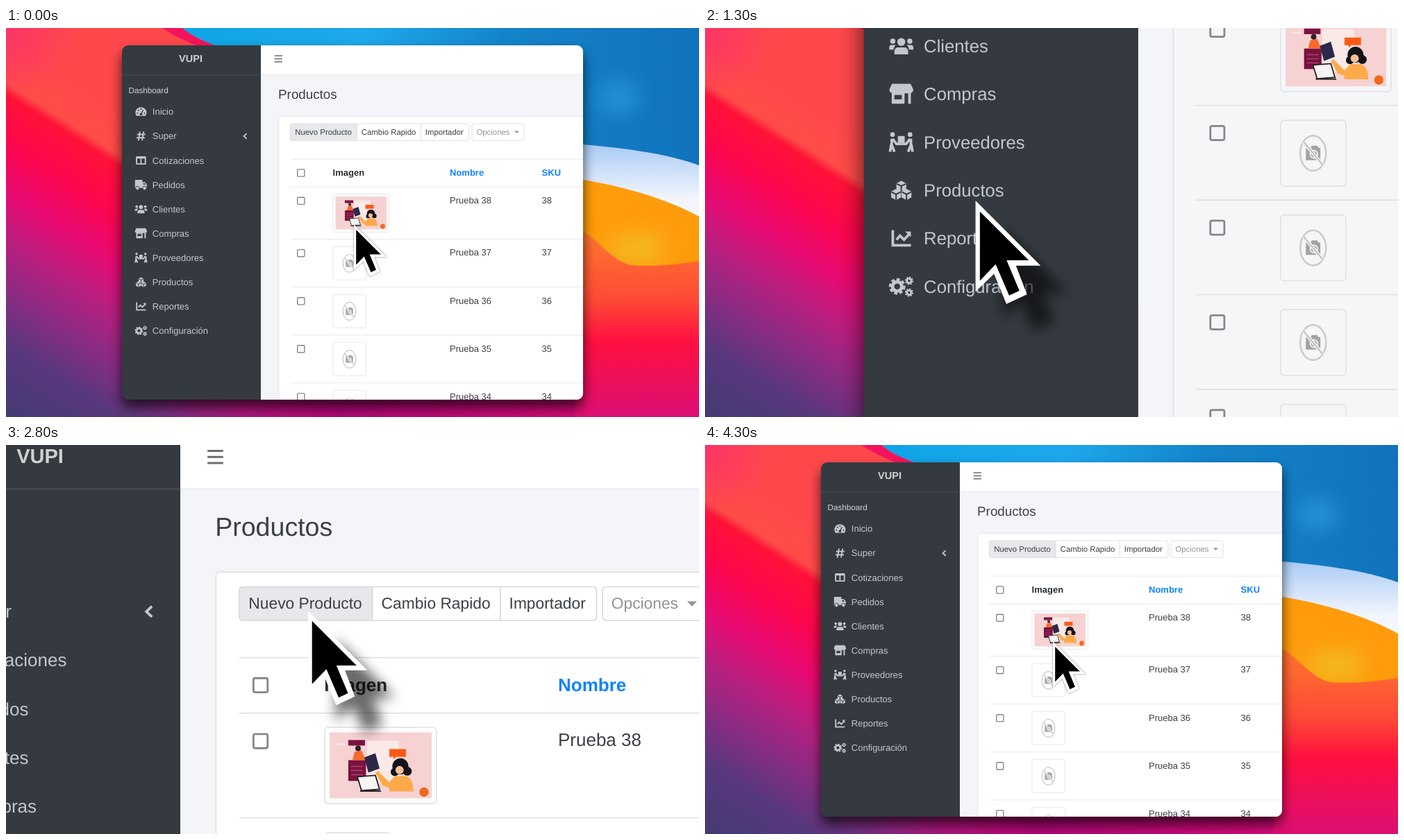
An HTML page that plays this animation: 998 px wide and 561 px high, repeating every 4.6 s.

```html
<!DOCTYPE html>
<html lang="es">
<head>
<meta charset="utf-8">
<title>Productos</title>
<style>
  html, body { margin: 0; width: 100%; height: 100%; overflow: hidden; }
  svg { display: block; width: 100vw; height: 100vh; }
  text { font-family: "Liberation Sans", Arial, sans-serif; font-size: 13px; fill: #3b4046; text-rendering: geometricPrecision; }
  .icon { fill: #c2c7d0; }
  .icon .hole { fill: #343a40; }
  .icon .line { fill: none; stroke: #c2c7d0; stroke-width: 1.9; }
  .icon .cut { fill: none; stroke: #343a40; stroke-width: 1; }
  .rule { stroke: #dee2e6; stroke-width: .8; }
  .soft { filter: blur(14px); }
</style>
</head>
<body>
<svg viewBox="0 0 998 561" preserveAspectRatio="none">
  <defs>
    <linearGradient id="sky">
      <stop offset=".25" stop-color="#0ea4e6"/><stop offset=".52" stop-color="#1ea8ec"/>
      <stop offset=".72" stop-color="#1484ca"/><stop offset="1" stop-color="#1072bd"/>
    </linearGradient>
    <linearGradient id="wave" gradientUnits="userSpaceOnUse" x1="0" y1="0" x2="-254" y2="396">
      <stop offset=".03" stop-color="#ff484c"/><stop offset=".14" stop-color="#ff4c48"/>
      <stop offset=".17" stop-color="#ff1238"/><stop offset=".3" stop-color="#fc0650"/>
      <stop offset=".42" stop-color="#e80a72"/><stop offset=".55" stop-color="#b81f80"/>
      <stop offset=".68" stop-color="#8a2c82"/><stop offset=".82" stop-color="#57387c"/>
      <stop offset="1" stop-color="#463a74"/>
    </linearGradient>
    <radialGradient id="corner" gradientUnits="userSpaceOnUse" cx="0" cy="0" r="100">
      <stop offset="0" stop-color="#fb3468"/><stop offset="1" stop-color="#fb3468" stop-opacity="0"/>
    </radialGradient>
    <linearGradient id="floor">
      <stop offset="0" stop-color="#b00878" stop-opacity="0"/><stop offset=".4" stop-color="#b00878"/>
      <stop offset="1" stop-color="#d80a78"/>
    </linearGradient>
    <linearGradient id="mist" x2="0" y2="1">
      <stop offset="0" stop-color="#a9cbf6"/><stop offset=".6" stop-color="#f3f6fd"/>
    </linearGradient>
    <linearGradient id="ember" x2="0" y2="1">
      <stop offset="0" stop-color="#ff7a2c"/><stop offset=".38" stop-color="#ff4a36"/>
      <stop offset=".6" stop-color="#ff1040"/><stop offset="1" stop-color="#dc0e74"/>
    </linearGradient>
    <clipPath id="frame"><rect x="167" y="25" width="664" height="511" rx="9"/></clipPath>
  </defs>

  <g id="wallpaper">
    <rect width="998" height="561" fill="url(#sky)"/>
    <ellipse class="soft" cx="882" cy="100" rx="30" ry="24" fill="#2590d6"/>
    <path d="M0 0H254C280 24 330 30 400 70L700 561H0Z" fill="url(#wave)"/>
    <path d="M225 0H254C280 24 330 30 400 70L330 60C300 30 260 24 225 0Z" fill="#f5145c"/>
    <rect width="110" height="110" fill="url(#corner)"/>
    <rect x="230" y="400" width="620" height="161" fill="url(#floor)"/>
    <path d="M820 167C880 172 950 180 998 198V300H820Z" fill="url(#mist)"/>
    <path d="M820 217C880 226 950 245 998 272V360H820Z" fill="#ff9c0c"/>
    <ellipse class="soft" cx="908" cy="318" rx="42" ry="24" fill="#f4b61e"/>
    <path d="M820 288C850 298 870 336 900 342C940 345 970 340 998 336V561H820Z" fill="url(#ember)"/>
  </g>
  <g id="camera">
    <rect x="167" y="36" width="664" height="511" rx="9" opacity=".7" style="filter:blur(9px)"/>
    <g id="window" clip-path="url(#frame)"></g>
  </g>
  <g id="shade">
    <g id="cursor">
      <path d="M0 0V66.5L13.5 53.5L22.5 75.5L37.5 68.5L29.5 47.5H47.5Z" fill="#fff"/>
      <path d="M3.2 8V58.5L14.7 46.5L24.5 69.3L32 65.8L22.7 43.6H38.8Z"/>
    </g>
  </g>
</svg>
<script>
const $ = id => document.getElementById(id);
const rect = (x, y, w, h, attrs = '') => `<rect x="${x}" y="${y}" width="${w}" height="${h}" ${attrs}/>`;
const circle = (x, y, r, attrs = '') => `<circle cx="${x}" cy="${y}" r="${r}" ${attrs}/>`;
const path = (d, attrs = '') => `<path d="${d}" ${attrs}/>`;
const text = (x, y, s, style = '') => `<text x="${x}" y="${y}" style="${style}">${s}</text>`;
const at = (x, y, body, attrs = '') => `<g transform="translate(${x} ${y})" ${attrs}>${body}</g>`;

const cog = (x, y, r, w) =>
  circle(x, y, r, `class="line" style="stroke-width:${w}"`) +
  circle(x, y, r + w * .7, `class="line" style="stroke-width:${w * .7}" pathLength="16" stroke-dasharray="1.2 .8"`);
const cube = (x, y) => at(x, y,
  path('M0-4.2L3.6-2.3V2L0 4L-3.6 2V-2.3Z') + path('M-3.4-2L0-.3L3.4-2M0-.3V4', 'class="cut"'));
const mirrored = body => body + `<g transform="scale(-1 1)">${body}</g>`;

const menu = [
  ['Inicio', path('M-6.5 6A8 8 0 1 1 6.5 6Z') +
    [[-5, 2], [-3.5, -2], [0, -4], [5, 2]].map(([x, y]) => circle(x, y, 1, 'class="hole"')).join('') +
    path('M0 3.5L3-2.5', 'class="cut" style="stroke-width:1.4"') + circle(0, 3.6, 1.8, 'class="hole"')],
  ['Super', path('M-1.5-6.5L-3.7 6.5M3.8-6.5L1.6 6.5M-5.5-2.4H6.3M-6.3 2.4H5.5', 'class="line"')],
  ['Cotizaciones', rect(-7.3, -6, 14.6, 12, 'rx="1.5"') +
    rect(-5.4, -2.8, 4.5, 7, 'class="hole"') + rect(.9, -2.8, 4.5, 7, 'class="hole"')],
  ['Pedidos', path('M-8.6-7H2V-4H5.2L8.3-.8V4.6H-8.6Z') + path('M3.3-2.6H4.8L6.8-.4H3.3Z', 'class="hole"') +
    [-5, 5].map(x => circle(x, 4.8, 2.7, 'style="stroke:#343a40;stroke-width:.9"')).join('')],
  ['Clientes', circle(0, -3, 2.9) + path('M-5 6V4Q-5 1-2 1H2Q5 1 5 4V6Z') +
    mirrored(circle(6.2, -3.6, 1.9) + path('M4-.8H7Q8.8-.8 8.8 1V2.6H5.8Q5.4.4 4-.8Z'))],
  ['Compras', path('M-6.8-7.5H6.8L8.8-3.2Q8.4-.6 6.2-.6H-6.2Q-8.4-.6-8.8-3.2Z') +
    rect(-7, -1, 9.4, 8, 'rx=".8"') + rect(-5, .6, 5.4, 3.2, 'class="hole"') + rect(5, -1, 2, 8)],
  ['Proveedores', rect(-2.5, -4.5, 5, 5, 'rx=".7"') + mirrored(circle(6.4, -5.6, 1.7) +
    path('M7-2.5V2L5 7M7.3 1.5L8.2 7M6.4-2.5L3.5 1.2H0', 'class="line"'))],
  ['Productos', cube(0, -2.8) + cube(-3.8, 3.2) + cube(3.8, 3.2)],
  ['Reportes', path('M-6.2-6V5H7', 'class="line"') + path('M-3.5 1L-1-2L2 1L5.6-3', 'class="line"') + path('M2.8-5H7V-.8Z')],
  ['Configuración', cog(-3, 0, 3.4, 2.5) + cog(5.7, -4.2, 1.6, 1.4) + cog(5.7, 4.4, 1.6, 1.4)]
];

function sidebar() {
  const items = menu.map(([label, icon], i) => {
    const y = 120.8 + 35.1 * i;
    return at(194.4, y, icon, 'class="icon"') + text(210.8, y + 4.5, label, 'fill:#c2c7d0');
  });
  return rect(167, 25, 200, 511, 'fill="#343a40"') + path('M167 67.5H367', 'stroke="#4b545c" stroke-width=".8"') +
    text(266, 48.6, 'VUPI', 'font-size:14.5px;font-weight:bold;fill:#cfd1d3;text-anchor:middle') +
    text(176.5, 93.8, 'Dashboard', 'font-size:11.7px;fill:#d0d4db') + items.join('') +
    path('M346.6 152.1L342.6 155.9L346.6 159.7', 'fill="none" stroke="#c2c7d0" stroke-width="1.9"');
}

function toolbar() {
  const border = 'fill="none" stroke="#d5d8dc" stroke-width=".8" rx="2.5"';
  const label = (x, s, color = '#3b4046') => text(x, 153.6, s, `font-size:11.4px;fill:${color}`);
  return rect(409.5, 138, 96, 24.3, 'fill="#e7e8eb" rx="2.5"') + rect(409.5, 138, 257.3, 24.3, border) +
    path('M505.3 138V162.3M597.4 138V162.3', 'stroke="#d5d8dc" stroke-width=".8"') + rect(671, 138, 75, 24.3, border) +
    label(416.2, 'Nuevo Producto') + label(511.8, 'Cambio Rapido') +
    label(603.8, 'Importador') + label(677.4, 'Opciones', '#8f9499') +
    path('M732 148.5H739L735.5 152.1Z', 'fill="#8f9499"');
}

const illustration = rect(0, 0, 73.5, 47.5, 'fill="#f6d2d3"') + rect(27, 6, 23, 31, 'fill="#fbe9e8"') +
  rect(5, 8, 6, 1, 'fill="#fbe9e8"') +
  rect(13.5, 5.5, 12, 4, 'fill="#7a1240"') + rect(13.5, 20, 12.7, 15, 'fill="#7a1240"') +
  path('M15.5 24.5H24M15.5 27.5H24M15.5 30.5H24', 'stroke="#a8466c" stroke-width=".7"') +
  path('M16.5 20L18 14L23 13L26 20Z', 'fill="#f8692a"') + circle(20.5, 11.5, 2, 'fill="#2b2028"') +
  path('M25 18L33 15L36 26L28 29Z', 'fill="#2b2947"') +
  path('M20 32L33 31L36 41L23 42Z', 'fill="#f7f5f4" stroke="#222" stroke-width=".9"') +
  path('M22 42.3H37', 'stroke="#222" stroke-width="1"') +
  circle(51, 24.5, 5.8, 'fill="#15131a"') + circle(47, 28.5, 3, 'fill="#15131a"') + circle(56, 28, 3.2, 'fill="#15131a"') +
  circle(50.4, 27.2, 3, 'fill="#f6c096"') +
  path('M33 29L35 28L43 36L47 31.5H55Q60 33 60.5 42.5H43V40L38 38Z', 'fill="#ffaa48"') +
  path('M43 12H55V17.6H48L46 19.5V17.6H43Z', 'fill="#ff5a14"') + circle(68, 43, 3.4, 'fill="#f06a1c"');

const noPhoto = '<ellipse rx="9.4" ry="12.8" fill="none" stroke="#cbcbcd" stroke-width="1.3"/>' +
  path('M-5.3-4H-1.8L-1-5.5H3L3.8-4H5.3V5.2H-5.3Z', 'fill="#a3a3a6"') +
  circle(.6, .8, 2.7, 'fill="none" stroke="#ededee" stroke-width="1"') +
  path('M-7-8.4L7 8.6', 'stroke="#f4f4f5" stroke-width="2.6"') + path('M-7-8.4L7 8.6', 'stroke="#c4c4c6" stroke-width="1.1"');

function table() {
  const box = y => rect(419.7, y - 5.1, 10.2, 10.2, 'rx="1.2" fill="#fff" stroke="#85868c" stroke-width="1.4" class="paper"');
  const thumb = (y, w, h) => rect(470.9, y, w, h, 'rx="2.5" fill="#fff" stroke="#dee2e6" stroke-width=".8" class="paper"');
  const line = y => path(`M409.5 ${y}H840`, 'class="rule"');
  const heading = (x, s, color) => text(x, 213.1, s, `font-weight:bold;fill:${color}`);
  let out = line(189.1) + box(209) + heading(470.6, 'Imagen', '#2a2e32') +
    heading(639, 'Nombre', '#0f83ff') + heading(771.6, 'SKU', '#0f83ff');
  for (let i = 0; i < 5; i++) {
    const top = i ? 304.5 + 69.1 * (i - 1) : 229.1, n = 38 - i;
    out += line(top) + box(top + 20.2) + text(639, top + 23.9, 'Prueba ' + n) + text(771.6, top + 23.9, n);
    out += i ? thumb(top + 10.9, 47.6, 48) + at(494.6, top + 34.9, noPhoto)
             : thumb(top + 10.3, 80.5, 55) + at(474.5, top + 13.9, illustration);
  }
  return out;
}

$('window').innerHTML =
  rect(367, 25, 470, 520, 'fill="#f4f5f9"') + rect(367, 25, 470, 42.5, 'fill="#fff"') + path('M367 67.5H840', 'class="rule"') +
  path('M386.6 40H397.9M386.6 44.4H397.9M386.6 48.8H397.9', 'stroke="#6c6d70" stroke-width="1.5"') +
  text(392.1, 101.5, 'Productos', 'font-size:18.8px') +
  rect(392.7, 127.4, 500, 500, 'rx="2.5" fill="#fff" stroke="#dfe2e6" stroke-width=".9" class="paper"') +
  toolbar() + table() + sidebar();

const LOOP = 4600, STEP = 100;
const cameraStart = { x: 499, y: 280.5, s: 1 };
const cameraMoves = [
  [526, { x: 299, y: 392.75, s: 2 }],
  [2057, { x: 499, y: 167, s: 2 }],
  [3052, cameraStart]
];
const cursorStart = { x: 501, y: 283 };
const cursorMoves = [
  [495, { x: 248.5, y: 374 }],
  [1992, { x: 459, y: 155.5 }],
  [3115, cursorStart]
];
const clamp = v => Math.max(0, Math.min(1, v));
const ease = p => p < .5 ? 8 * p ** 4 : 1 - 8 * (1 - p) ** 4;

function follow(start, moves, duration, t) {
  const v = { ...start };
  for (const [begin, to] of moves) {
    const p = ease(clamp((t - begin) / duration));
    for (const k in v) v[k] += (to[k] - v[k]) * p;
  }
  return v;
}

const papers = document.querySelectorAll('.paper');

function draw(t) {
  const cam = follow(cameraStart, cameraMoves, 1012, t);
  const tip = follow(cursorStart, cursorMoves, 715, t);
  const tx = 499 - cam.x * cam.s, ty = 280.5 - cam.y * cam.s;
  const press = 1 - .1 * clamp(1 - Math.abs(t - 2800) / 150);
  const lift = cam.s - 1;
  const drop = .5 + 40 * lift;
  $('camera').setAttribute('transform', `translate(${tx} ${ty}) scale(${cam.s})`);
  $('cursor').setAttribute('transform',
    `translate(${tip.x * cam.s + tx} ${tip.y * cam.s + ty}) scale(${cam.s * press})`);
  $('shade').style.filter = `drop-shadow(${drop}px ${drop}px ${1 + 8 * lift}px rgba(0,0,0,.58))`;
  // The card takes the page tint while the header is out of view.
  const paper = t >= 800 && t < 2600 ? '#f5f6f8' : '#fff';
  papers.forEach(p => p.setAttribute('fill', paper));
}

let shown = -1;
function tick() {
  const t = Math.floor(performance.now() % LOOP / STEP) * STEP;
  if (t !== shown) draw(shown = t);
  requestAnimationFrame(tick);
}
tick();
</script>
</body>
</html>
```
